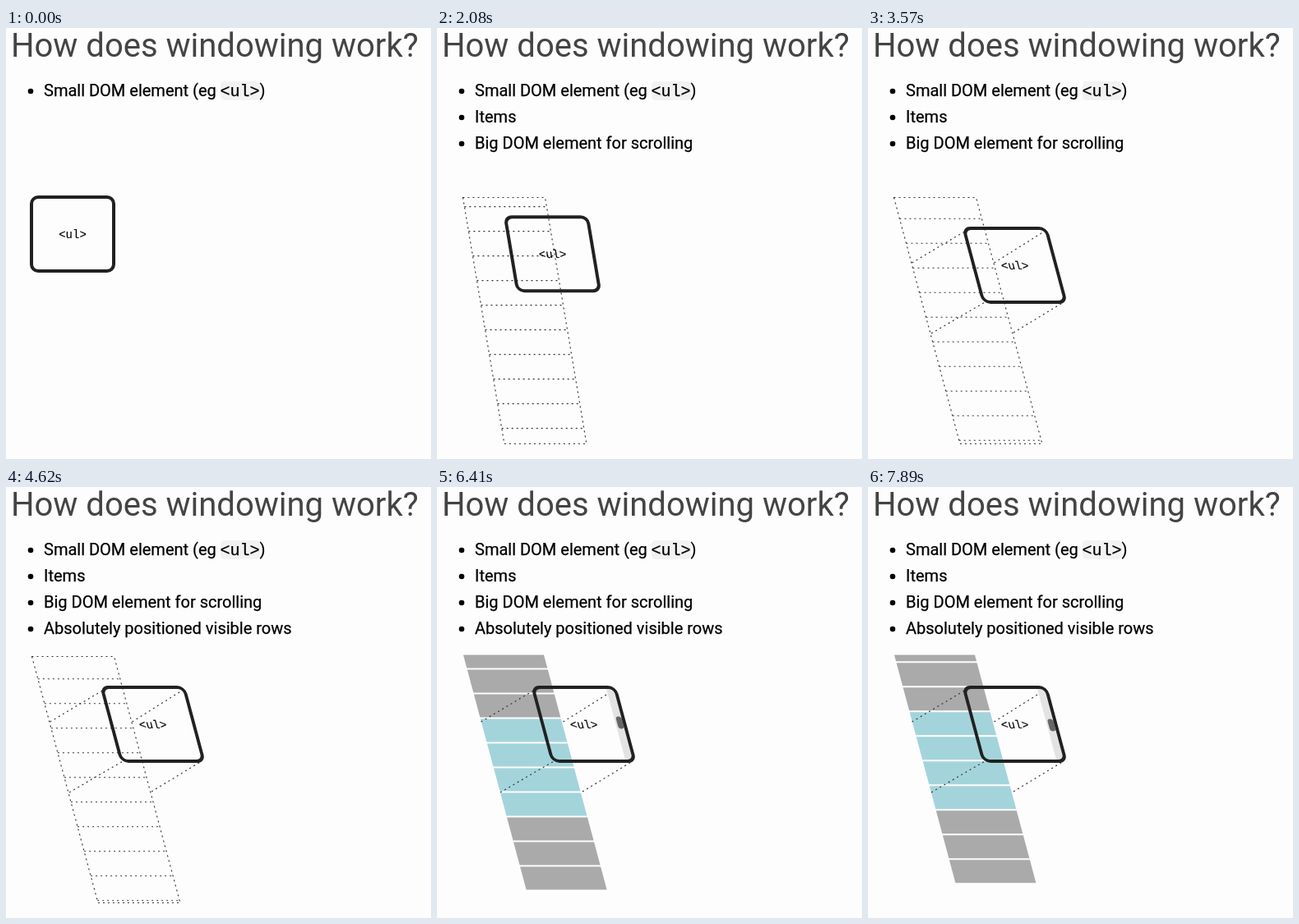
Recreate the animation shown at these times as an HTML page. Size 517x525 px, loop 8 s.

```html
<!DOCTYPE html>
<html lang="en">
<head>
<meta charset="utf-8">
<title>How does windowing work?</title>
<style>
  html, body { margin: 0; width: 100%; height: 100%; overflow: hidden; background: #fdfdfd; }
  svg { display: block; width: 517px; height: 525px; }
  text { font: 20px Roboto, sans-serif; fill: #000; stroke: #000; stroke-width: .25; white-space: pre; }
  .title { font-size: 40px; fill: #444; stroke: none; }
  .code { font-family: "Liberation Mono", monospace; }
  .label { font-size: 14px; text-anchor: middle; stroke-width: .1; }
  .dotted { fill: none; stroke: #333; stroke-width: 1.2; stroke-dasharray: 2 4; }
</style>
</head>
<body>
<svg viewBox="0 0 517 525">
  <defs>
    <pattern id="stripes" width="14" height="14" patternUnits="userSpaceOnUse" patternTransform="rotate(45)">
      <rect width="14" height="14" fill="#aaa"/>
      <rect width="7" height="14" fill="#b3b3b3"/>
    </pattern>
    <clipPath id="columnClip"><rect x="-2" y="-2" width="104" height="304"/></clipPath>
  </defs>
  <text class="title" x="6" y="34.5">How does windowing work?</text>
  <rect x="261" y="65" width="48" height="23" rx="5" fill="#f2f2f2"/>
  <g id="bullets"></g>
  <g id="column">
    <g id="outline" class="dotted"><rect width="100" height="300"/><path id="lines"/></g>
    <g id="rows" clip-path="url(#columnClip)"><g id="list"></g></g>
  </g>
  <path id="projection" class="dotted"
    d="M53.5 286 119 247M153.5 286 214 248M77 372 142 334M177 371 238 334"/>
  <g id="view">
    <g id="scrollbar">
      <rect x="39" y="-44" width="10" height="88" fill="#e3e3e3"/>
      <rect id="thumb" x="41" y="-14.5" width="7" height="15" rx="3.5" fill="#666"/>
    </g>
    <rect x="-50" y="-45" width="100" height="90" rx="8" fill="none" stroke="#212121" stroke-width="4"/>
    <text class="label code" y="5">&lt;ul&gt;</text>
  </g>
</svg>
<script>
const LOOP = 8000, ROW = 30, ROW_COUNT = 10;
const ITEMS = 150, SKEW = 1712, PROJECT = 2720, TEXT = 4600, FILL = 4640, SCROLL = 6060;
const WINDOW_TOP = 80, WINDOW_BOTTOM = 166;
const $ = id => document.getElementById(id);
const set = (el, attrs) => { for (const key in attrs) el.setAttribute(key, attrs[key]); };
const clamp = x => Math.min(1, Math.max(0, x));
const progress = (t, start, duration) => clamp((t - start) / duration);

// cubic-bezier(.25, .1, .25, 1)
function ease(x) {
  const bezier = (s, a, b) => 3 * (1 - s) ** 2 * s * a + 3 * (1 - s) * s * s * b + s ** 3;
  let low = 0, high = 1;
  for (let i = 0; i < 20; i++) {
    const mid = (low + high) / 2;
    if (bezier(mid, .25, .25) < x) low = mid; else high = mid;
  }
  return bezier(low, .1, 1);
}

const bullets = [
  ['Small DOM element (eg <tspan class="code" x="260.5">&lt;ul&gt;</tspan>)', 0],
  ['Items', ITEMS],
  ['Big DOM element for scrolling', SKEW],
  ['Absolutely positioned visible rows', TEXT]
];
$('bullets').innerHTML = bullets.map(([html], i) =>
  `<g><circle cx="30" cy="${77 + 32 * i}" r="3.3"/><text x="46" y="${83 + 32 * i}">${html}</text></g>`).join('');

const isVisible = (i, shift) =>
  (i + 1) * ROW + shift > WINDOW_TOP && i * ROW + shift < WINDOW_BOTTOM;

$('list').innerHTML = Array.from({ length: ROW_COUNT }, (_, i) =>
  `<g><rect x="1" y="${i * ROW + 1}" width="98" height="28"/>` +
  `<text class="label" x="50" y="${i * ROW + 20}">${isVisible(i, 0) ? 'Rendered' : 'Not Rendered'}</text></g>`).join('');

function draw(t) {
  bullets.forEach(([, start], i) => set($('bullets').children[i], { opacity: +(t >= start) }));

  // The column and the view share one skewed plane.
  const tilt = ease(progress(t, SKEW, 1000));
  const plane = `translate(31.5 206.5) skewX(${15 * tilt})`;
  set($('column'), { transform: plane });
  set($('view'), { transform: `${plane} translate(${49.5 + 75.4 * tilt} ${44.5 + 38 * tilt})` });
  set($('projection'), { opacity: ease(progress(t, PROJECT, 450)) });

  const fill = ease(progress(t, FILL, 450));
  const offset = t < SKEW ? 0 : t < SKEW + 3000 ? (t - SKEW) / 1000 % 1 * ROW : ROW;
  set($('lines'), {
    d: Array.from({ length: ROW_COUNT }, (_, i) => `M0 ${offset + i * ROW}h100`).join('')
  });
  set($('outline'), { opacity: ease(progress(t, ITEMS - 30, 450)) * (1 - fill) });
  set($('rows'), { opacity: fill });
  set($('scrollbar'), { opacity: fill });

  const scrolling = t >= SCROLL;
  const cycle = scrolling ? (t - SCROLL) / 1200 : 0;
  const shift = -ROW * ease(cycle > 1 ? 2 - cycle : cycle);
  set($('list'), { transform: `translate(0 ${shift})` });
  set($('thumb'), { transform: `translate(0 ${-shift * .34})` });
  [...$('list').children].forEach((row, i) => {
    const idle = scrolling ? '#aaa' : 'url(#stripes)';
    set(row.firstChild, { fill: isVisible(i, shift) ? '#a4d4db' : idle });
    set(row.lastChild, { opacity: scrolling ? 0 : 1 });
  });
}

const origin = performance.now();
function tick() {
  draw((performance.now() - origin) % LOOP);
  requestAnimationFrame(tick);
}
tick();
</script>
</body>
</html>
```
